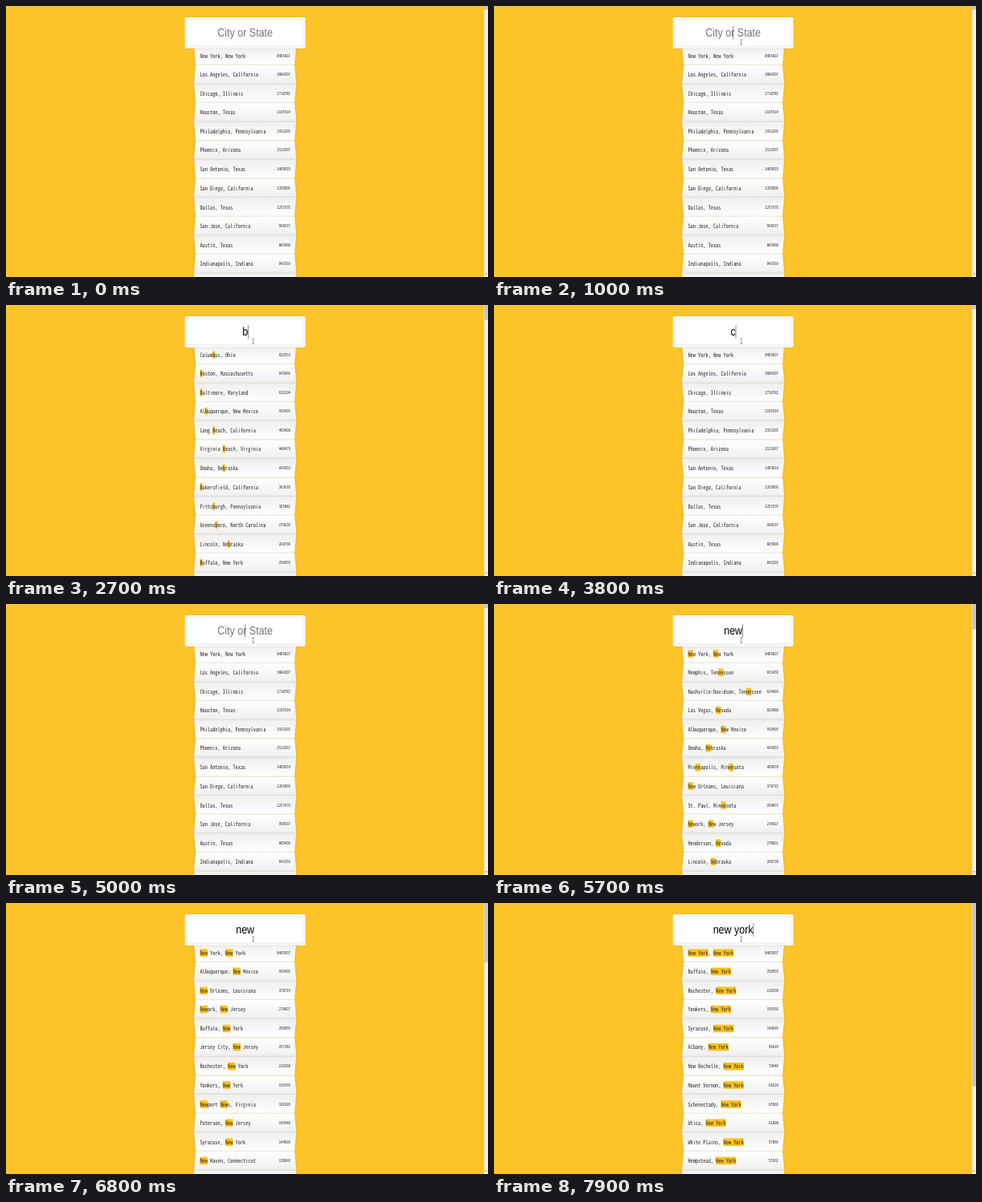
These frames come from a looping animation (600 by 338 pixels, 8000 ms). An HTML page:

```html
<!DOCTYPE html>
<html lang="en">
<head>
<meta charset="utf-8">
<title>City search</title>
<style>
  html, body { margin: 0; width: 100%; height: 100%; overflow: hidden; background: #fcc429; }
  svg { position: absolute; left: 0; top: 0; }
  text { white-space: pre; text-rendering: geometricPrecision; }
  #label { font: 40px "Liberation Sans", Arial, sans-serif; }
  #list {
    font-family: "Noto Sans Mono CJK JP", "Noto Sans Mono CJK SC", "Noto Sans Mono", monospace;
    fill: #2b2b2b;
  }
  .people { font-size: .75em; text-anchor: end; }
</style>
</head>
<body>
<!-- a 1920 px wide browser window, squeezed to the stage -->
<svg width="600" height="338" viewBox="0 0 1920 923.5" preserveAspectRatio="none">
  <defs>
    <linearGradient id="down" x2="0" y2="1"><stop stop-color="#fff"/><stop offset="1" stop-color="#efefef"/></linearGradient>
    <linearGradient id="up" x2="0" y2="1"><stop stop-color="#efefef"/><stop offset="1" stop-color="#fff"/></linearGradient>
    <filter id="glow" y="-.3" height="1.6"><feDropShadow dx="0" dy="0" stdDeviation="5" flood-opacity=".14"/></filter>
    <filter id="boxGlow" y="-.2" height="1.4"><feDropShadow dx="0" dy="0" stdDeviation="2.5" flood-opacity=".12"/></filter>
  </defs>
  <rect width="1920" height="924" fill="#fcc429"/>
  <g id="form">
    <g id="list"></g>
    <rect x="-240" y="38.5" width="480" height="106" rx="5" fill="#f6f6f6" filter="url(#boxGlow)"/>
    <rect x="-230" y="48.5" width="460" height="86" fill="#fff" stroke="#000" stroke-opacity=".06"/>
    <text id="label" y="105.2"></text>
    <rect id="caret" y="68.5" width="1.5" height="46" fill="#111"/>
  </g>
  <g id="bar">
    <rect x="1905" width="15" height="924" fill="#f1f1f1"/>
    <rect id="thumb" x="1906" width="13" fill="#c1c1c1"/>
    <path d="M1909 911H1916L1912.5 915Z" fill="#505050"/>
  </g>
  <path id="mouse" d="M-4 -8.5H-1L0 -7L1 -8.5H4M0 -7V7M-4 8.5H-1L0 7L1 8.5H4" fill="none" stroke="#333" stroke-width="1.5"/>
</svg>
<script>
const cities = `8405837 New York, New York
3884307 Los Angeles, California
2718782 Chicago, Illinois
2195914 Houston, Texas
1553165 Philadelphia, Pennsylvania
1513367 Phoenix, Arizona
1409019 San Antonio, Texas
1355896 San Diego, California
1257676 Dallas, Texas
998537 San Jose, California
885400 Austin, Texas
843393 Indianapolis, Indiana
842583 Jacksonville, Florida
837442 San Francisco, California
822553 Columbus, Ohio
792862 Charlotte, North Carolina
792727 Fort Worth, Texas
688701 Detroit, Michigan
674433 El Paso, Texas
653450 Memphis, Tennessee
652405 Seattle, Washington
649495 Denver, Colorado
645966 Boston, Massachusetts
634464 Nashville-Davidson, Tennessee
622104 Baltimore, Maryland
610613 Oklahoma City, Oklahoma
603488 Las Vegas, Nevada
556495 Albuquerque, New Mexico
526116 Tucson, Arizona
469428 Long Beach, California
448479 Virginia Beach, Virginia
434353 Omaha, Nebraska
400070 Minneapolis, Minnesota
378715 New Orleans, Louisiana
363630 Bakersfield, California
305841 Pittsburgh, Pennsylvania
294873 St. Paul, Minnesota
279639 Greensboro, North Carolina
278427 Newark, New Jersey
270811 Henderson, Nevada
268738 Lincoln, Nebraska
258959 Buffalo, New York
257342 Jersey City, New Jersey
249688 St. Petersburg, Florida
210358 Rochester, New York
199766 Yonkers, New York
182020 Newport News, Virginia
145948 Paterson, New Jersey
144669 Syracuse, New York
130660 New Haven, Connecticut
127558 Elizabeth, New Jersey
110378 Manchester, New Hampshire
98424 Albany, New York
79446 New Rochelle, New York
68224 Mount Vernon, New York
65902 Schenectady, New York
61808 Utica, New York
57866 White Plains, New York
55361 Hempstead, New York
49974 Troy, New York`.split("\n").map(line => {
  const gap = line.indexOf(" ");
  return { people: line.slice(0, gap), place: line.slice(gap + 1) };
});

// Length of the whole result list, which sets the scroll thumb
const totals = { "": 1000, a: 800, b: 260, c: 480, n: 740, ne: 150, new: 63, "new ": 60, newy: 0 };

// time, typed text, query the list shows, caret visible
const steps = [
  [0, "", "", 0], [1000, "", "", 1],
  [1400, "a", "", 1], [1500, "a", "a", 1], [1800, "a", "a", 0], [2000, "", "a", 0],
  [2500, "b", "", 1], [2600, "b", "b", 1], [2900, "b", "b", 0], [3300, "", "b", 1], [3400, "", "b", 0],
  [3800, "c", "", 1], [3900, "c", "c", 1], [4200, "c", "c", 0], [4600, "", "c", 0],
  [4900, "", "", 1],
  [5300, "n", "", 1], [5400, "n", "n", 1], [5500, "ne", "n", 1], [5600, "ne", "ne", 1],
  [5700, "new", "ne", 1], [5800, "new", "new", 1],
  [6100, "newy", "new", 1], [6200, "newy", "newy", 1], [6400, "new", "newy", 1], [6700, "new", "new", 0],
  [6900, "new ", "new", 1], [7000, "new ", "new ", 1], [7100, "new y", "new ", 1], [7200, "new y", "new y", 1],
  [7300, "new yo", "new y", 1], [7400, "new yo", "new yo", 1], [7500, "new yor", "new yo", 1],
  [7600, "new yor", "new yor", 1], [7800, "new york", "new yor", 1], [7900, "new york", "new york", 1]
];

const LOOP = 8000, TOP = 134.5, ROW = 64.5, HALF = 200, PAD = 20, LETTER = 10.1;
const WINDOW = 937, TRACK = 907;
const $ = id => document.getElementById(id);
const set = (id, attrs) => { for (const k in attrs) $(id).setAttribute(k, attrs[k]); };
const show = (id, on) => set(id, { visibility: on ? "visible" : "hidden" });

const pen = document.createElement("canvas").getContext("2d");
function textWidth(font, string) {
  pen.font = font;
  return pen.measureText(string).width;
}

const family = getComputedStyle($("list")).fontFamily;
$("list").style.fontSize = 100 * LETTER / textWidth("100px " + family, "n") + "px";

// A sheet tilted by 3 degrees, seen from 100 px away
function sheet(mid, tilt, drop) {
  const angle = tilt * Math.PI / 180;
  const edge = dy => {
    const y = dy + drop;
    const zoom = 100 / (100 - y * Math.sin(angle));
    return { x: HALF * zoom, y: mid + y * Math.cos(angle) * zoom };
  };
  const a = edge(-ROW / 2), b = edge(ROW / 2);
  const fill = tilt > 0 ? "down" : "up";
  return `<g filter="url(#glow)">
    <path d="M${-a.x} ${a.y}H${a.x}L${b.x} ${b.y}H${-b.x}Z" fill="url(#${fill})"/>
    <rect x="${-b.x}" y="${b.y - 1}" width="${2 * b.x}" height="1" fill="#d8d8d8"/></g>`;
}

function row(city, i, query) {
  const odd = i % 2 === 0, drop = odd ? 3 : 2;
  const mid = TOP + (i + .5) * ROW, y = mid + drop, left = PAD - HALF;
  const found = query ? [...city.place.matchAll(new RegExp(query, "gi"))] : [];
  const marks = found.map(m =>
    `<rect x="${left + m.index * LETTER}" y="${y - 13}" width="${query.length * LETTER}" height="26" fill="#fcc21e"/>`);
  return sheet(mid, odd ? -3 : 3, drop) + marks.join("") +
    `<text x="${left}" y="${y + 7}">${city.place}</text>
     <text class="people" x="${HALF - PAD}" y="${y + 4.5}">${city.people}</text>`;
}

let shown = null;
function showList(query) {
  if (query === shown) return;
  shown = query;
  const hits = cities.filter(c => c.place.toLowerCase().includes(query)).slice(0, 13);
  $("list").innerHTML = hits.map((c, i) => row(c, i, query)).join("");

  const total = totals[query] ?? 19;
  show("bar", total);
  set("form", { transform: `translate(${total ? 952.5 : 960} 0)` });
  set("thumb", { height: Math.max(14, TRACK * WINDOW / (TOP + total * ROW)) });
}

function draw(time) {
  const t = Math.floor(time % LOOP / 100) * 100;
  const [, typed, query, caret] = steps.findLast(s => s[0] <= t);
  showList(query);

  const words = typed || "City or State";
  const half = textWidth('40px "Liberation Sans", Arial, sans-serif', words) / 2;
  $("label").textContent = words;
  set("label", { x: -half, fill: typed ? "#000" : "#757575" });
  set("caret", { x: typed ? half : 0 });
  show("caret", caret);

  const away = (1 - Math.min(1, Math.max(0, (t - 400) / 500))) ** 2;
  show("mouse", t >= 500);
  set("mouse", { transform: `translate(${985 - 5 * away} ${123 + 12 * away})` });
}

const start = performance.now();
function tick() {
  draw(performance.now() - start);
  requestAnimationFrame(tick);
}
tick();
</script>
</body>
</html>
```
